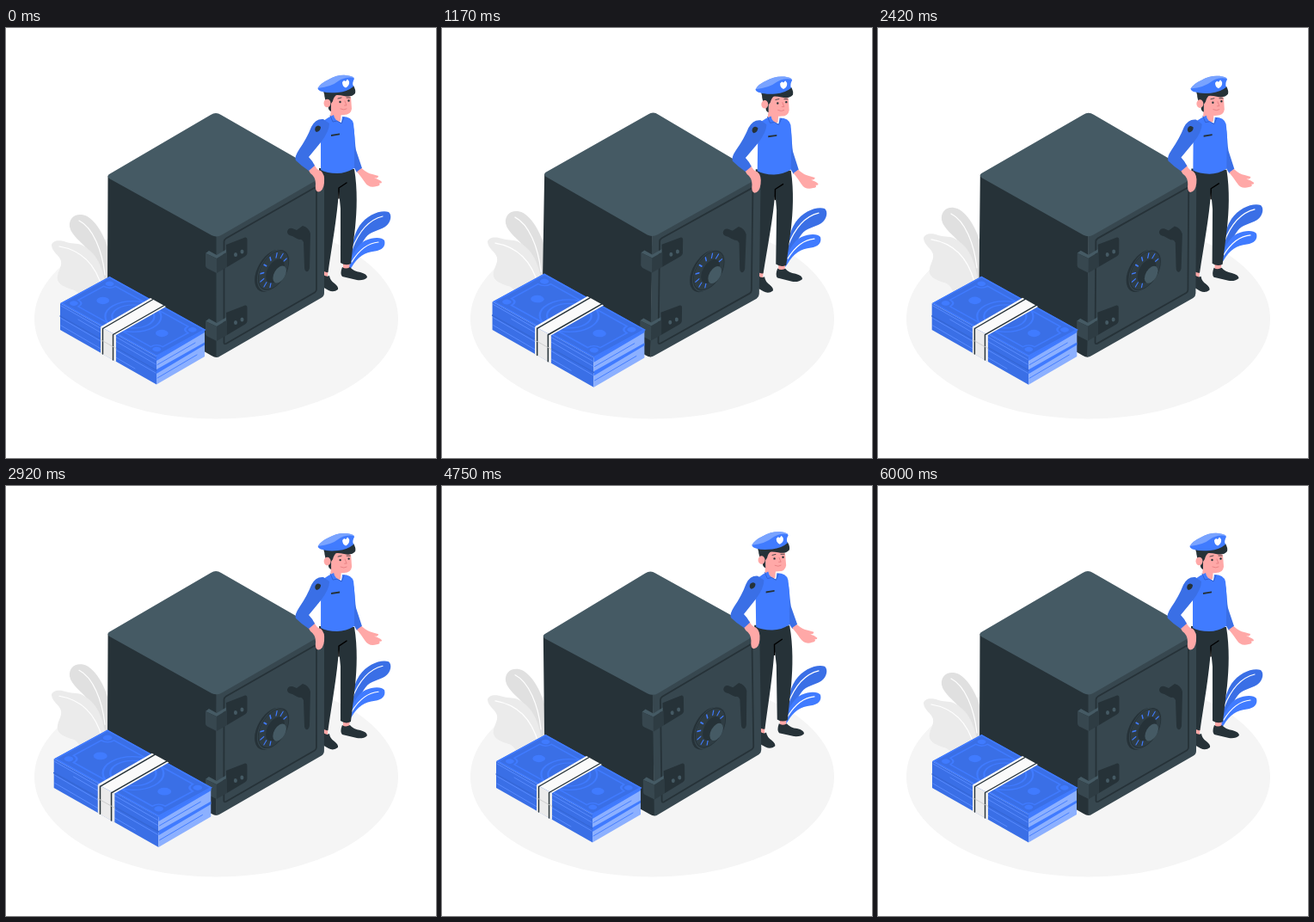
Write an HTML page that moves like this. It is 500 px wide and 500 px high and loops after 6040 ms.

```html
<!DOCTYPE html>
<html lang="en">
<head>
<meta charset="utf-8">
<title>Safe and guard</title>
<style>
html, body { margin: 0; width: 100%; height: 100%; overflow: hidden; background: #fff; }
svg { display: block; width: 100vw; height: 100vh; }
.ink { fill: #263238; } .slate { fill: #37474f; } .steel { fill: #455a64; }
.blue { fill: #407bff; } .deep { fill: #3a6fe6; } .pale { fill: #8cb0ff; }
.skin { fill: #ffa8a7; } .white { fill: #fff; }
.line { fill: none; stroke-linecap: round; stroke-linejoin: round; }
</style>
</head>
<body>
<svg viewBox="0 0 500 500">
  <defs>
    <g id="hinge">
      <path class="ink" d="M256 252L278 243.500Q280.500 243 280.500 246V262Q280 264.500 278 265.500L257 278Z"/>
      <path class="steel" d="M232 262L236 259L245 264L256 257.500V261L245 268Z"/>
      <path class="slate" d="M232 262L245 268V285L234 279.500Q232 278.500 232 276Z"/>
      <path fill="#2e3c43" d="M245 268L257 261V278L245 285Z"/>
      <ellipse class="steel" cx="267" cy="263.500" rx="2" ry="2.500"/>
      <ellipse class="steel" cx="274.500" cy="260" rx="2" ry="2.500"/>
    </g>
  </defs>

  <ellipse cx="244.500" cy="338" rx="211.500" ry="116.500" fill="#f5f5f5"/>

  <g id="plants">
    <path fill="#e0e0e0" d="M74 231C73 222 79 216 88 217C101 218 114 239 119 258V312H108C111 290 104 270 96 259C89 249 76 242 74 231Z"/>
    <path fill="#ebebeb" d="M53 253C53 247 63 246 70 249C79 252 84 249 91 254C107 263 115 283 117 310L90 318C84 310 84 306 77 304C67 301 58 297 60 288C61 281 65 278 64 271C62 264 54 261 53 253Z"/>
    <path class="line" d="M85 224C101 232 112 259 115 287M62 254C86 258 104 274 112 303" stroke="#fff" stroke-width="1.200"/>
    <path class="deep" d="M399 278C401 264 402 243 411 230C420 217 436 211 445 214C449 217 448 226 441 231C433 236 424 236 418 244C411 253 408 264 401 278Z"/>
    <path class="blue" d="M399 282V272C405 259 411 250 418 247C427 243 437 243 440 247C442 254 437 258.500 429 259.500C417 261 409 266 402 278Z"/>
    <path class="line" d="M402 258C410 237 421 223 438 219M402 272C410 259 420 250 433 249" stroke="#fff" stroke-width="1.200"/>
  </g>

  <g id="scene">
    <!-- legs -->
    <path class="skin" d="M369 280H374.500L374 290L369 289ZM392 272H400L399 281L392 280Z"/>
    <path class="ink" d="M369 287Q373 290 376 288Q377 294 382 297Q387 301 386 304Q381 308 375 305L368 301ZM391 278Q395 281 400 278Q404 283 412 284Q420 286 420 290Q416 294 408 293L391 289Q388 286 391 278Z"/>
    <path class="ink" d="M364 163L405 164C409 188 408 213 406 232L401 274Q395 277 389 273L389 210L387 190C385 220 379 253 374.500 284Q371 285 367 281Z"/>
    <path class="line" d="M387 198V186Q390 184 396 180" stroke="#000" stroke-width="1.400"/>

    <!-- safe -->
    <path class="ink" d="M118.500 172L245 236V383Q242 383 239 381L121 313Q118 311 118 307Z"/>
    <path class="slate" d="M244.500 236L366 170Q370 171 370 176V308Q370 311.500 367 313.500L249 381.500Q247 383 244.500 383Z"/>
    <path class="steel" d="M120 170L238 101Q244 97 250 101L365 167Q370 171 366 174L251 240.500Q245 244 239 241L120 175Q117 172 120 170Z"/>
    <path class="line" d="M253.500 366V248.500Q253.500 246 256 244.500L361 184.500V304Q361 306 359 307.500L256 367Q253.500 368 253.500 366Z" stroke="#263238" stroke-width="1.800"/>
    <use href="#hinge"/>
    <use href="#hinge" y="79"/>
    <path class="ink" d="M327 237Q328 232 333 233L338 235L345 230Q352 232 354 239L353 279Q352 284 349 283Q347 282 347 278L346 249Q344 245 341 246Q338 245 333 242Q327 241 327 237Z"/>
    <g transform="matrix(.866 -.5 0 1 309.500 281.500)">
      <circle class="ink" r="22" cx="-1.500"/>
      <circle class="slate" r="22" cx="1.800" cy="1"/>
      <circle class="ink" r="21" cx="1.800" cy="1"/>
      <circle class="slate" r="20" cx="1.800" cy="1" opacity=".55"/>
      <g id="ticks" transform="translate(1.800 1)" stroke="#407bff" stroke-width="1.500" stroke-linecap="round"></g>
      <circle class="ink" r="12.500" cx="4" cy="3"/>
      <circle class="steel" r="9" cx="10" cy="10"/>
    </g>

    <!-- guard -->
    <path class="deep" d="M401 108C406 115 405 130 407 142L414 163L408 168L401 156Z"/>
    <path class="skin" d="M408 167L413.500 163Q420 169 426 170L433 172Q433 175 428 174.500Q434 176 437 179Q437 181 434 180.500Q436 183 431 184Q422 187 417 179Q413 173 408 167Z"/>
    <path class="skin" d="M378 93L390 97L389 108Q384 112 377 105Z"/>
    <path class="blue" d="M375 104L381 101Q382 108 390 110L391 103Q402 103 404 111Q406 127 405 145L405 163Q395 169 385 169Q373 169 366 165V133Q365 114 369 108Z"/>
    <path class="skin" d="M351 164L358 158Q361 165 366 166Q371 170 370 180Q369 190 363 190.500Q359 190 360 181Q360 173 354 169Z"/>
    <path class="deep" d="M369 106Q360 105 355 115Q350 128 341 141Q335 150 337 154Q343 160 352 166L359 160Q356 154 352 150L366 133Q376 120 376 111Z"/>
    <path class="line" d="M377 102L380 109L385 108L390 111L393 104" stroke="#315fce" stroke-width=".9"/>
    <path class="ink" d="M360 115Q363 112 366 115Q366 120 361 121Q358 119 360 115ZM378 124L388 122.500V124.300L378 126Z"/>
    <path class="skin" d="M378 78Q389 74 401 80L402 94Q401 101 393 101Q383 102 378 95Z"/>
    <path class="ink" d="M370 75Q373 71 385 77Q381 80 380 85L378 88L378 97Q374 95 375 91Q370 84 370 75Z"/>
    <ellipse class="skin" cx="373.500" cy="87.500" rx="4" ry="4.800"/>
    <circle class="ink" cx="388.500" cy="86" r="1.200"/>
    <circle class="ink" cx="398.500" cy="84.500" r="1.200"/>
    <path class="line" d="M386 82L390 81M396 81L400 81" stroke="#263238" stroke-width=".8"/>
    <path class="line" d="M394 85L396 90L393.500 90M389 94Q393 96 396 94" stroke="#e77f83" stroke-width=".9"/>
    <path class="ink" d="M369 73Q386 75 404 67Q407 72 406 76Q402 81 393 79Q385 77 379 79L370 77Z"/>
    <path class="blue" d="M362.500 70Q366 64 375 60Q385 54 396 55Q404 56 405 59Q402 64 404 68Q397 74 386 75Q374 76 368 74Q363 73 362.500 70Z"/>
    <path class="pale" d="M362.500 70Q366 64 375 60Q385 54 396 55Q404 56 405 58Q394 56 386 62Q379 68 362.500 70Z" opacity=".75"/>
    <path class="white" d="M391 63L393 61L395 62L397 59.500L399 62Q400 67 395 69.500Q391 68 391 63Z"/>
  </g>

  <g id="money">
    <path class="deep" d="M63 320L175 382V414.500L63 351Z"/>
    <path class="pale" d="M175 382L231 351V382L175 414.500Z"/>
    <path class="blue" d="M175 382L231 351V354L175 387ZM175 397L231 365.500V368.500L175 402Z"/>
    <path class="line" d="M63 335L175 398" stroke="#3567d6" stroke-width="1.400"/>
    <path class="line" d="M64 323L174 385.500M64 337.500L174 401M84 339L174 391M64 346L150 396" stroke="#5b8dff" stroke-width=".9"/>
    <path class="line" d="M176 391.500L220 366M176 407L222 380" stroke="#407bff" stroke-width=".9"/>
    <g transform="matrix(.868 .481 .866 -.471 63.300 320)">
      <path class="deep" d="M0 0H129V66H0Z"/>
      <g fill="none" stroke="#407bff" stroke-width="1.800">
        <path d="M.9.9H128.100V65.100H.9ZM16 8H113Q113 16 121 16V50Q113 50 113 58H16Q16 50 8 50V16Q16 16 16 8Z"/>
        <circle cx="64.500" cy="33" r="26.500"/>
        <circle cx="64.500" cy="33" r="20"/>
      </g>
      <g class="blue">
        <circle cx="25" cy="32" r="6"/><circle cx="104" cy="32" r="6"/>
        <circle cx="9" cy="9" r="4"/><circle cx="120" cy="9" r="4"/>
        <circle cx="9" cy="57" r="4"/><circle cx="120" cy="57" r="4"/>
      </g>
    </g>
    <path fill="#fafafa" d="M110 347.500L168 314L186 324L128 357Z"/>
    <path fill="#ebebeb" d="M110 347.500L128 357V388L110 378Z"/>
    <path class="line" d="M112.500 379V349.500L171 315.500M124.500 386V356.500L184 322.500" stroke="#263238" stroke-width="1.400"/>
    <path class="line" d="M110 362.500L128 372.500" stroke="#c7c7c7" stroke-width=".8"/>
  </g>
</svg>
<script>
const byId = id => document.getElementById(id);

// Dial marks; the lower right is hidden behind the knob.
let marks = '';
for (let deg = 105; deg <= 345; deg += 30) {
  const a = deg * Math.PI / 180, x = Math.cos(a), y = Math.sin(a);
  marks += `<path d="M${x * 13.5} ${y * 13.5}L${x * 18} ${y * 18}"/>`;
}
byId('ticks').innerHTML = marks;

// Linear interpolation through [position, value] stops.
function track(p, stops) {
  const i = Math.max(1, stops.findIndex(s => s[0] >= p));
  const [a, u] = stops[i - 1], [b, v] = stops[i];
  return u + (v - u) * (p - a) / (b - a);
}

const LOOP = 6040, CYCLE = 6000;
const sway = [[0, 0], [.25, 1], [.75, -1], [1, 0]];
const pulse = [[0, 1], [.1, 1.1], [.3, 1], [.4, 1], [.5, 1.1], [.6, 1], [1, 1]];
const lift = [[0, 0], [.5, -10], [1, 0]];

function draw() {
  const p = Math.min(1, performance.now() % LOOP / CYCLE);
  byId('scene').setAttribute('transform', `rotate(${track(p, sway)} 278 219)`);
  byId('plants').setAttribute('transform', `translate(0 ${track(p, lift)})`);
  byId('money').setAttribute('transform',
    `translate(147.3 352) scale(${track(p, pulse)}) translate(-147.3 -352)`);
  requestAnimationFrame(draw);
}
draw();
</script>
</body>
</html>
```
